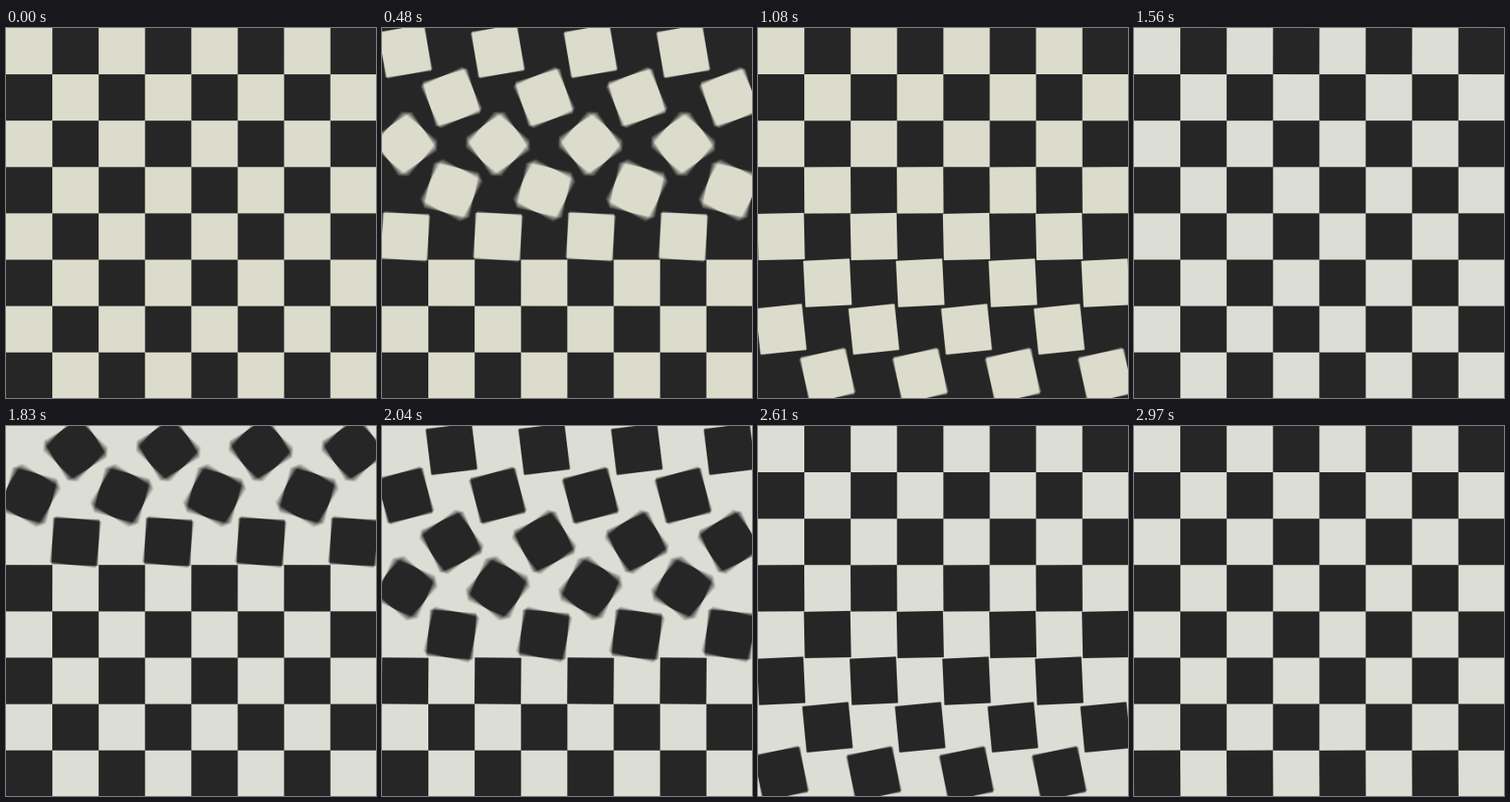
These frames come from a looping animation (400x400 px, 3000 ms). An HTML page with a canvas:

```html
<!DOCTYPE html>
<html lang="en">
<head>
<meta charset="utf-8">
<title>Turning checkerboard</title>
<style>
  html, body { margin: 0; width: 100%; height: 100%; overflow: hidden; background: #262626; }
  canvas { display: block; width: 400px; height: 400px; }
</style>
</head>
<body>
<canvas id="stage" width="400" height="400"></canvas>
<script>
const SIZE = 400, CELL = 50.1, CELLS = 8;
const LOOP = 3000, STEP = 30;
const ROW_DELAY = 90, TURN_TIME = 870;
const SHUTTER = 75, SAMPLES = 17;
const PHASES = [
  { start: 0, parity: 0, tile: '#dbdccc', ground: '#262626' },
  { start: 1520, parity: 1, tile: '#262626', ground: '#dcddd4' }
];

const ctx = document.getElementById('stage').getContext('2d');
const layer = document.createElement('canvas');
layer.width = layer.height = SIZE;
const mask = layer.getContext('2d');

// Quarter turn: quick start, long settling tail.
function turn(ms) {
  if (ms <= 0) return 0;
  if (ms >= TURN_TIME) return Math.PI / 2;
  const left = (1 - (ms / TURN_TIME) ** 4) / (1 + (ms / 290) ** 4);
  return (1 - left) * Math.PI / 2;
}

function drawTile(col, row, angle) {
  const c = Math.cos(angle), s = Math.sin(angle);
  mask.setTransform(c, s, -s, c, (col + 0.5) * CELL, (row + 0.5) * CELL);
  mask.fillRect(-CELL / 2, -CELL / 2, CELL, CELL);
}

// Sum evenly weighted shutter samples into the mask's alpha.
function drawTiles(ms, parity) {
  mask.globalCompositeOperation = 'lighter';
  mask.globalAlpha = 1 / SAMPLES;
  mask.fillStyle = '#000';
  for (let i = 0; i < SAMPLES; i++) {
    const shift = ((i + 0.5) / SAMPLES - 0.5) * SHUTTER;
    for (let row = 0; row < CELLS; row++) {
      const angle = turn(ms + shift - row * ROW_DELAY);
      for (let col = (row + parity) % 2; col < CELLS; col += 2) drawTile(col, row, angle);
    }
  }
}

function render(time) {
  const phase = PHASES[time >= PHASES[1].start ? 1 : 0];
  mask.setTransform(1, 0, 0, 1, 0, 0);
  mask.globalAlpha = 1;
  mask.clearRect(0, 0, SIZE, SIZE);
  drawTiles(time - phase.start, phase.parity);

  mask.setTransform(1, 0, 0, 1, 0, 0);
  mask.globalAlpha = 1;
  mask.globalCompositeOperation = 'source-in';
  mask.fillStyle = phase.tile;
  mask.fillRect(0, 0, SIZE, SIZE);

  ctx.fillStyle = phase.ground;
  ctx.fillRect(0, 0, SIZE, SIZE);
  ctx.drawImage(layer, 0, 0);
}

let start = null;
function tick(now) {
  if (start === null) start = now;
  render(Math.floor((now - start + 1) / STEP) * STEP % LOOP);
  requestAnimationFrame(tick);
}
render(0);
requestAnimationFrame(tick);
</script>
</body>
</html>
```
